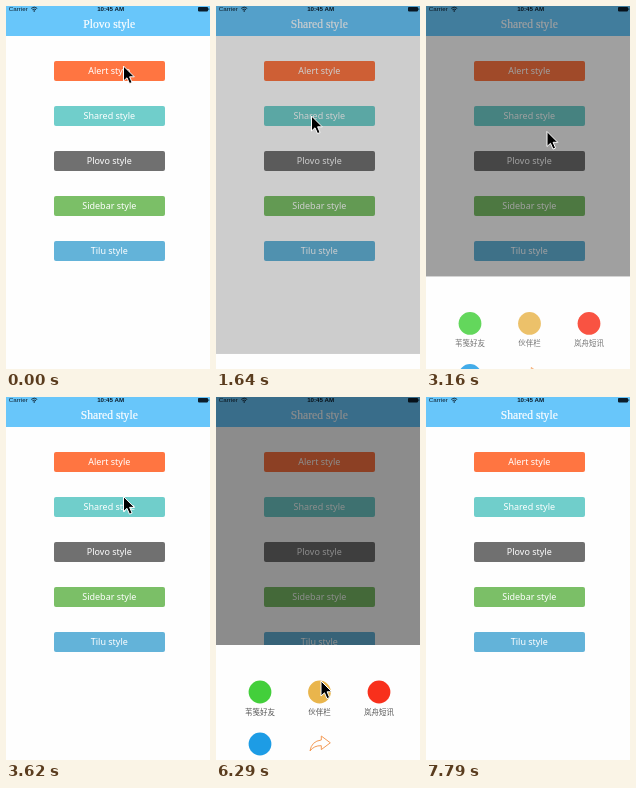
Write an HTML page that moves like this. It is 204x363 px and loops after 8830 ms.

```html
<!DOCTYPE html>
<html lang="en">
<head>
<meta charset="utf-8">
<title>Share sheet</title>
<style>
  html, body { margin: 0; width: 100%; height: 100%; overflow: hidden; background: #fff; }
  svg { display: block; width: 100%; height: 100%; }
  .status { font: 6.2px "Liberation Sans", Arial, sans-serif; fill: #0b1d2b; }
  .title { font: 11.6px "Liberation Serif", "Times New Roman", serif; fill: #fff; stroke: #fff; stroke-width: .2; }
  .button { font: 9px "Noto Sans", sans-serif; fill: #fff; }
  .label { font: 7.5px "Noto Sans CJK SC", "Noto Sans CJK", sans-serif; fill: #555; }
  .mid { text-anchor: middle; }
</style>
</head>
<body>
<svg viewBox="0 0 204 363">
  <rect width="204" height="363" fill="#fefefe"/>
  <rect width="204" height="30" fill="#68c6fa"/>
  <g class="status">
    <text x="2.8" y="5.4">Carrier</text>
    <text class="mid" x="104.6" y="5.4" font-weight="bold">10:45 AM</text>
    <g fill="none" stroke="#0b1d2b" stroke-width=".9">
      <path d="M25.2 2.4Q28.2 -.2 31.2 2.4M26.4 3.8Q28.2 2.2 30 3.8"/>
    </g>
    <circle cx="28.2" cy="5" r=".8"/>
    <rect x="192" y="1" width="10" height="4.4" rx=".8"/>
    <rect x="202.4" y="2.3" width=".8" height="1.8"/>
  </g>
  <text id="title" class="title mid" x="103.3" y="22.3"></text>
  <g id="buttons"></g>
  <rect id="shade" width="204" height="363"/>
  <g id="sheet">
    <rect width="204" height="170" fill="#fefefe"/>
    <g id="items">
      <path d="M105.3 91L114.3 97.8L105.3 104.6V100.7Q98 100.4 94 106Q95.4 96.2 105.3 95Z"
            fill="none" stroke="#f49a55" stroke-width="1" stroke-linejoin="round"/>
    </g>
  </g>
  <path id="cursor" d="M0 0V15L3.5 11.8L6 17.6L8.6 16.5L6.1 10.8H10.8Z"
        fill="#000" stroke="#fff" stroke-width="1" stroke-linejoin="round"/>
</svg>
<script>
const LOOP = 8830, STEP = 57.4, TOP = 206, HEIGHT = 157;
const $ = id => document.getElementById(id);

function add(parent, tag, attrs, text = "") {
  const el = document.createElementNS("http://www.w3.org/2000/svg", tag);
  for (const key in attrs) el.setAttribute(key, attrs[key]);
  el.textContent = text;
  parent.append(el);
}

[["Alert", "#ff7541"], ["Shared", "#70cecb"], ["Plovo", "#707070"],
 ["Sidebar", "#7bbf67"], ["Tilu", "#63b3d9"]].forEach(([name, fill], i) => {
  const y = 55 + 45 * i;
  add($("buttons"), "rect", { x: 48, y, width: 111, height: 20, rx: 2, fill });
  add($("buttons"), "text", { class: "button mid", x: 103.3, y: y + 12.7 }, name + " style");
});

[[44, 47, "#43cf3b", "苇笺好友"], [103.5, 47, "#e9b54c", "伙伴栏"],
 [163, 47, "#f8301c", "岚舟短讯"], [44, 99, "#1d9ce5", ""]].forEach(([cx, cy, fill, name]) => {
  add($("items"), "circle", { cx, cy, r: 11.4, fill });
  if (name) add($("items"), "text", { class: "label mid", x: cx, y: cy + 23 }, name);
});

// Each burst of movement advances in even steps from its own start.
const bursts = [0, 60, 1410, 1580, 2160, 3160, 4210, 5080, 6000, 6810, 7510];
function stepped(t) {
  const start = bursts.filter(b => b <= t).pop();
  return start + Math.floor((t - start + 8) / STEP) * STEP;
}

// time, x, y of the pointer tip
const path = [
  [0, 117.5, 60], [60, 118, 61], [290, 123, 82], [570, 95.5, 110],
  [2140, 95.5, 110], [2440, 121, 125.5],
  [3330, 121, 125.5], [3620, 117.5, 99.5], [3960, 107, 72],
  [4190, 107, 72], [4490, 94, 112],
  [5250, 94, 112], [5700, 102, 242],
  [6000, 102, 242], [6287, 105, 284], [6570, 112, 322],
  [6840, 112, 322], [7205, 143, 329],
  [7490, 143, 329], [7785, 206, 366]
];
function pointer(t) {
  const i = path.findIndex(k => k[0] > t);
  if (i < 0) return path[path.length - 1].slice(1);
  const [t0, x0, y0] = path[i - 1], [t1, x1, y1] = path[i];
  const u = (t - t0) / (t1 - t0);
  return [x0 + (x1 - x0) * u, y0 + (y1 - y0) * u];
}

function ease(u) {
  u = Math.min(1, Math.max(0, u));
  return u * u * (3 - 2 * u);
}
const shown = (p, from = 0) => ({ drop: from + (HEIGHT - from) * (1 - p), alpha: p ** .36 });

function sheetAt(t, y) {
  if (t < 1580) return shown(0);
  if (t < 1740) return shown(ease((t - 1580) / 300));
  if (t < 3160) return shown(1);
  if (t < 5080) return shown(1 - ease((t - 3028) / 300));
  if (t < 6000) return shown(ease((t - 5080) / 300));
  if (t < 6810) return { drop: y - 242, alpha: 1 };
  return shown(1 - ease((t - 6770) / 380), 80);
}

function draw(now) {
  const time = now % LOOP, t = stepped(time);
  const [x, y] = pointer(t);
  const { drop, alpha } = sheetAt(t, y);
  $("title").textContent = (time < 1410 ? "Plovo" : "Shared") + " style";
  $("shade").setAttribute("opacity", .45 * alpha);
  $("sheet").setAttribute("transform", `translate(0 ${TOP + drop})`);
  $("items").setAttribute("opacity", alpha);
  $("cursor").setAttribute("transform", `translate(${x} ${y})`);
  $("cursor").setAttribute("visibility", time < 7790 ? "visible" : "hidden");
}

const begin = performance.now();
function tick() {
  draw(performance.now() - begin);
  requestAnimationFrame(tick);
}
tick();
</script>
</body>
</html>
```
